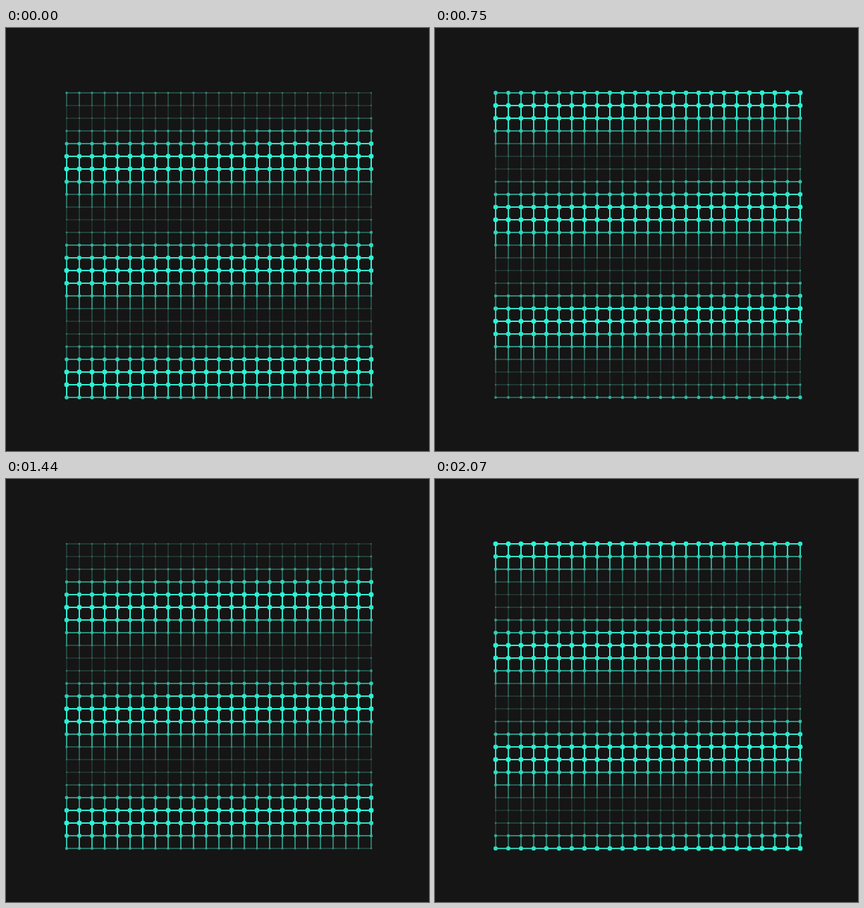
An HTML page with a canvas that plays this animation: 600x600 px, repeating every 2.1 s.

```html
<!DOCTYPE html>
<html lang="en">
<head>
<meta charset="utf-8">
<title>Grid wave</title>
<style>
  html, body { margin: 0; height: 100%; overflow: hidden; background: #151515; }
  canvas { display: block; }
</style>
</head>
<body>
<canvas id="stage" width="600" height="600"></canvas>
<script>
const ctx = document.getElementById('stage').getContext('2d');
const SIZE = 25, GAP = 18, LEFT = 86, TOP = 92;
const LOOP = 2100, STEP = 30;
const DIM = [60, 108, 94], BRIGHT = [46, 245, 215];

const mix = (a, b, k) => a + (b - a) * k;

function drawNode(col, row, time) {
  // The phase runs on from the end of one row to the start of the next.
  const phase = (row * SIZE + col) * 0.03 - 4.33 - time * 0.004;
  const level = (1 + Math.cos(phase)) / 2;
  const x = LEFT + col * GAP, y = TOP + row * GAP;
  const color = `rgb(${DIM.map((c, i) => Math.round(mix(c, BRIGHT[i], level)))})`;

  ctx.strokeStyle = ctx.fillStyle = color;
  ctx.lineWidth = mix(0.6, 2, level);
  ctx.beginPath();
  if (col < SIZE - 1) {
    ctx.moveTo(x, y);
    ctx.lineTo(x + GAP, y);
  }
  if (row < SIZE - 1) {
    ctx.moveTo(x, y);
    ctx.lineTo(x, y + GAP);
  }
  ctx.stroke();

  ctx.beginPath();
  ctx.arc(x, y, mix(1, 3.5, level), 0, Math.PI * 2);
  ctx.fill();
}

function draw(time) {
  ctx.fillStyle = '#151515';
  ctx.fillRect(0, 0, 600, 600);
  for (let row = 0; row < SIZE; row++)
    for (let col = 0; col < SIZE; col++) drawNode(col, row, time);
}

let start;
function tick(now) {
  start ??= now;
  draw(Math.floor(((now - start) % LOOP) / STEP) * STEP);
  requestAnimationFrame(tick);
}
draw(0);
requestAnimationFrame(tick);
</script>
</body>
</html>
```
